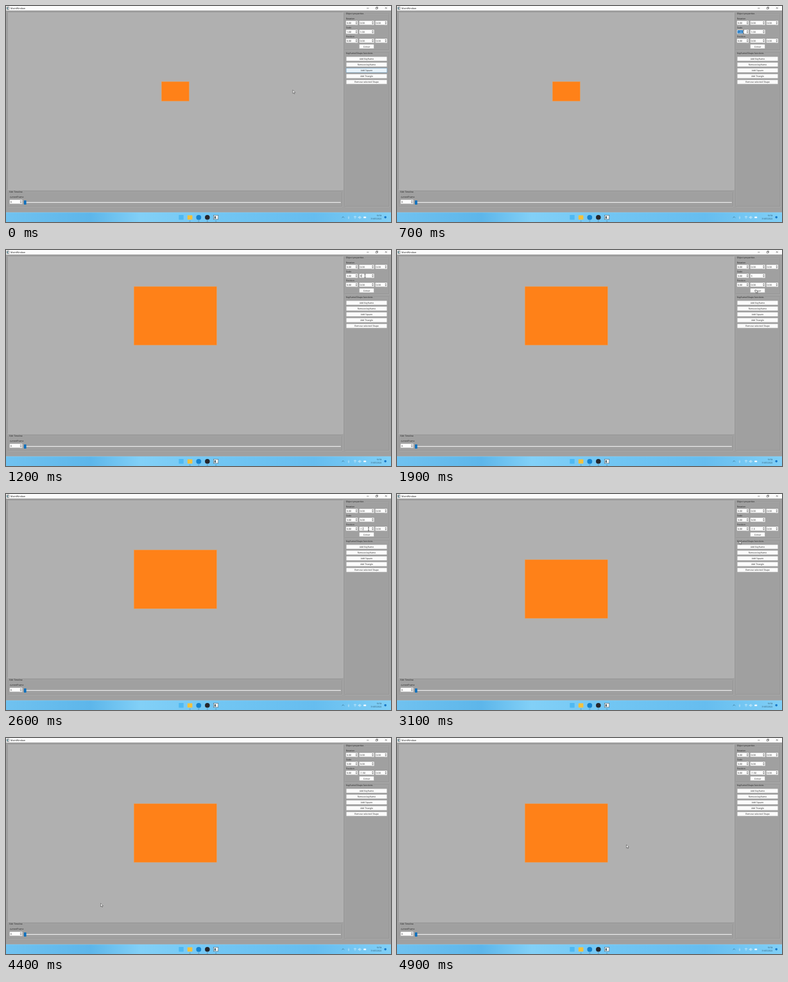
An HTML page for the animation above (5 s loop, 600 by 338 pixels).

```html
<!DOCTYPE html>
<html lang="en">
<head>
<meta charset="utf-8">
<title>MainWindow</title>
<style>
html, body { margin: 0; width: 100%; height: 100%; overflow: hidden; background: #a0a0a0; }
svg { display: block; width: 100vw; height: 100vh; }
text { font: 3.4px "Open Sans", "Noto Sans", sans-serif; fill: #151515; text-rendering: geometricPrecision; white-space: pre; }
text.num { font-size: 3.7px; }
text.title { font-size: 3.75px; }
text.mid { text-anchor: middle; }
text.end { text-anchor: end; font-size: 3.2px; fill: #24495f; }
</style>
</head>
<body>
<svg id="stage" viewBox="0 0 600 338" preserveAspectRatio="none">
  <defs>
    <linearGradient id="bar">
      <stop offset="0" stop-color="#70c2f0"/>
      <stop offset=".22" stop-color="#5db6ea"/>
      <stop offset=".35" stop-color="#82d0f7"/>
      <stop offset=".55" stop-color="#72c6f3"/>
      <stop offset=".8" stop-color="#66bdef"/>
      <stop offset="1" stop-color="#80cff6"/>
    </linearGradient>
  </defs>
</svg>
<script>
const LOOP = 5000, STEP = 100;
const stage = document.getElementById('stage');

function add(tag, attrs, text) {
  const el = document.createElementNS('http://www.w3.org/2000/svg', tag);
  for (const k in attrs) el.setAttribute(k, attrs[k]);
  if (text !== undefined) el.textContent = text;
  stage.appendChild(el);
  return el;
}
const box = (x, y, w, h, fill, more) => add('rect', { x, y, width: w, height: h, fill, ...more });
const line = (d, stroke, w = 0.6) => add('path', { d, stroke, 'stroke-width': w, fill: 'none' });
const label = (x, y, s, cls = '') => add('text', { x, y, class: cls }, s);
const dot = (cx, cy, r, fill) => add('circle', { cx, cy, r, fill });

function group(x, y, w, h, name, nameWidth) {
  const path = o => `M${x + 1 + o} ${y + o}H${x + o}V${y + h + o}H${x + w + o}V${y + o}H${x + nameWidth + 2.5 + o}`;
  line(path(0.5), '#bcbcbc', 0.5);
  line(path(0), '#858585', 0.5);
  label(x + 1.8, y + 1.3, name);
}

function spin(x, y, w, value) {
  box(x, y, w, 6.8, '#fdfdfd', { stroke: '#858585', 'stroke-width': 0.4 });
  box(x + w - 4.3, y + 0.3, 4, 6.2, '#eeeeee');
  const cx = x + w - 2.3;
  add('path', { d: `M${cx - 1.1} ${y + 2.6}l1.1 -1.3l1.1 1.3zM${cx - 1.1} ${y + 4.3}l1.1 1.3l1.1 -1.3z`, fill: '#333' });
  const mark = box(x + 1, y + 1, 8.6, 4.8, '#1674c4', { visibility: 'hidden' });
  const text = label(x + 1.3, y + 4.7, value, 'num');
  return (s, selected) => {
    text.textContent = s;
    text.style.fill = selected ? '#fff' : '';
    mark.setAttribute('visibility', selected ? 'visible' : 'hidden');
  };
}

function button(x, y, w, name) {
  const face = box(x, y, w, 6.8, '#fbfbfb', { rx: 0.5, stroke: '#8b8b8b', 'stroke-width': 0.4 });
  label(x + w / 2, y + 4.7, name, 'mid');
  return face;
}

// window frame
box(0, 0, 600, 338, '#a0a0a0');
box(0, 0, 600, 7, '#fcfcfc');
box(1.2, 1.7, 3.6, 3.6, '#e8eef2', { stroke: '#555', 'stroke-width': 0.6 });
box(1.6, 2.2, 1.4, 2.8, '#4a7f8c');
label(7, 4.9, 'MainWindow', 'title');
line('M562.2 3.4h3.2', '#333', 0.5);
line('M576.2 2.5h2.4v2.4h-2.4zM577 2.4v-.7h2.4v2.4h-.7', '#333', 0.5);
line('M590.8 1.8l2.9 2.9M593.7 1.8l-2.9 2.9', '#333', 0.5);

// viewport
box(2.5, 9.5, 522.5, 278, '#b0b0b0');
line('M2.5 287.5V9.5H525', '#909090', 0.6);
line('M2.5 287.6H525.1V9.5', '#c0c0c0', 0.6);
const shape = box(242, 118, 43, 31, '#ff8118', { stroke: '#e9a25f', 'stroke-width': 0.5 });

// properties
group(528, 12, 69, 56.5, 'Object properties', 29);
label(530, 20.6, 'Rotation');
label(530, 34.6, 'Scale');
label(530, 48.7, 'Position');
const row = (y, values) => values.map((v, i) => spin([529.6, 550.2, 575.2][i], y, [18.8, 23.6, 19][i], v));
row(23, ['0.00', '0.00', '0.00']);
const [scaleX, scaleY] = row(37, ['1.00', '1.00']);
const posY = row(51, ['0.00', '0.00', '0.00'])[1];
button(550.5, 59.9, 23, 'Colour');

group(528, 73.5, 69, 240, 'Keyframe/Shape functions', 42);
const faces = ['Add Keyframe', 'Remove keyframe', 'Add Square', 'Add Triangle', 'Remove selected Shape']
  .map((name, i) => button(530.2, 79.2 + i * 9.05, 63.6, name));

// timeline
group(3.5, 291, 520, 22.5, 'Edit Timeline', 22);
label(5.8, 299.6, 'currentFrame');
spin(5.5, 303, 20, '0');
box(28, 306.6, 494, 1.5, '#eeeeee', { stroke: '#8a8a8a', 'stroke-width': 0.3 });
box(28, 304.3, 3.6, 6.4, '#0b6fbf', { rx: 0.5 });

// taskbar
box(0, 323, 600, 15, 'url(#bar)');
line('M0 323.2H600', '#8fd0f2', 0.5);
box(269.3, 327, 7.4, 7.4, '#4fb9f2', { rx: 0.6 });
box(282.8, 327.4, 7.6, 6.8, '#f5c23c', { rx: 0.7 });
dot(300.3, 330.8, 3.9, '#1683cf');
dot(313.8, 330.7, 3.8, '#26262b');
box(323.6, 327.4, 7.2, 6.4, '#f3f6f7', { stroke: '#51646e', 'stroke-width': 0.6 });
box(324.7, 329, 2.4, 3.6, '#4b6874');
for (const x of [286.6, 300.3, 313.8, 327.2]) line(`M${x - 1} 336.6h2`, '#496b80', 0.6);
line('M523.6 331.4l1.7 -1.7l1.7 1.7', '#2e5873', 0.6);
line('M534 328.7v2.6M532.8 331q1.2 2 2.4 0M534 332v1.3', '#d9eefa', 0.6);
line('M542 330q2 -2 4 0M542.8 331.3q1.2 -1.2 2.4 0M544 332.2v.7', '#eef8ff', 0.6);
line('M549.2 330.2h1l1.3 -1.2v3.6l-1.3 -1.2h-1zM552.7 329.6q1 1.2 0 2.4', '#eef8ff', 0.6);
box(557.2, 329.4, 4, 2.6, '#eef8ff', { rx: 0.5 });
label(585.3, 329.4, '10:54', 'end');
label(585.3, 334.2, '31/05/2022', 'end');
dot(591.2, 330.6, 1.8, '#1878c8');

// caret and pointers
const caret = box(0, 0, 0.5, 4.6, '#111');
const arrow = add('path', { d: 'M0 0V5.2L1.3 4.1L2.2 6L3 5.6L2.1 3.8H3.8Z', fill: '#fff', stroke: '#222', 'stroke-width': 0.45 });
const beam = add('path', { d: 'M-1 -2.6H1M0 -2.6V2.6M-1 2.6H1', stroke: '#222', 'stroke-width': 0.6, fill: 'none' });

// time, x, y
const path = [
  [0, 447, 131.5], [100, 455, 121], [500, 540, 44], [600, 540, 40.5], [900, 540, 40.5],
  [1000, 559.5, 40.5], [1300, 559.5, 40.5], [1700, 559, 62], [2000, 559, 62], [2300, 565, 54.7],
  [3000, 565, 54.7], [3300, 470, 110], [3600, 172, 254], [3800, 28, 304], [3900, 21, 307.5],
  [4200, 25, 307.5], [4600, 270, 210], [4800, 357, 168], [4900, 357.5, 167]
];
// time, text, selected
const typing = [
  [scaleX, [[0, '1.00'], [600, '1.00', true], [800, '3'], [1000, '3.00']]],
  [scaleY, [[0, '1.00'], [1100, '1.00', true], [1200, '3'], [2300, '3.00']]],
  [posY, [[0, '0.00'], [2300, '0.00', true], [2400, '-'], [2500, '-1'], [2600, '-1.'], [2700, '-1.5'], [4000, '-1.50']]]
];
// time, x scale, y scale, y position
const poses = [[0, 1, 1, 0], [800, 3, 1, 0], [1200, 3, 3, 0], [2500, 3, 3, -1], [2700, 3, 3, -1.5]];
// start, end, x, y
const carets = [[800, 1000, 533.3, 38.1], [1200, 1300, 553.8, 38.1], [2600, 2700, 556.2, 52.1]];

const last = (rows, t) => rows.filter(r => r[0] <= t).pop();

function pointer(t) {
  const i = path.findIndex(p => p[0] > t);
  if (i < 0) return path[path.length - 1].slice(1);
  const a = path[i - 1], b = path[i], k = (t - a[0]) / (b[0] - a[0]);
  return [a[1] + (b[1] - a[1]) * k, a[2] + (b[2] - a[2]) * k];
}

function overField(x, y) {
  const inRow = [23, 37, 51].some(top => y >= top && y <= top + 6.8);
  return (inRow && x > 530 && x < 570) || (x > 5 && x < 22 && y > 303 && y < 310);
}

function draw(time) {
  const t = Math.floor(time % LOOP / STEP) * STEP;
  const [, sx, sy, py] = last(poses, t);
  const w = 43 * sx, h = 30.6 * sy;
  shape.setAttribute('x', 263.8 - w / 2);
  shape.setAttribute('y', 148.9 - h - py * 30.5);
  shape.setAttribute('width', w);
  shape.setAttribute('height', h);

  for (const [set, rows] of typing) {
    const [, text, selected] = last(rows, t);
    set(text, !!selected);
  }
  const c = carets.find(r => t >= r[0] && t < r[1]);
  caret.setAttribute('visibility', c ? 'visible' : 'hidden');
  if (c) caret.setAttribute('transform', `translate(${c[2]} ${c[3]})`);

  const focus = t < 600;
  faces[2].setAttribute('stroke', focus ? '#3f8fc6' : '#8b8b8b');
  faces[2].setAttribute('fill', focus ? '#e9f3fa' : '#fbfbfb');

  const [x, y] = pointer(t), text = overField(x, y);
  arrow.setAttribute('visibility', text ? 'hidden' : 'visible');
  beam.setAttribute('visibility', text ? 'visible' : 'hidden');
  (text ? beam : arrow).setAttribute('transform', `translate(${x} ${y})`);
}

const start = performance.now();
function tick() {
  draw(performance.now() - start);
  requestAnimationFrame(tick);
}
tick();
</script>
</body>
</html>
```
